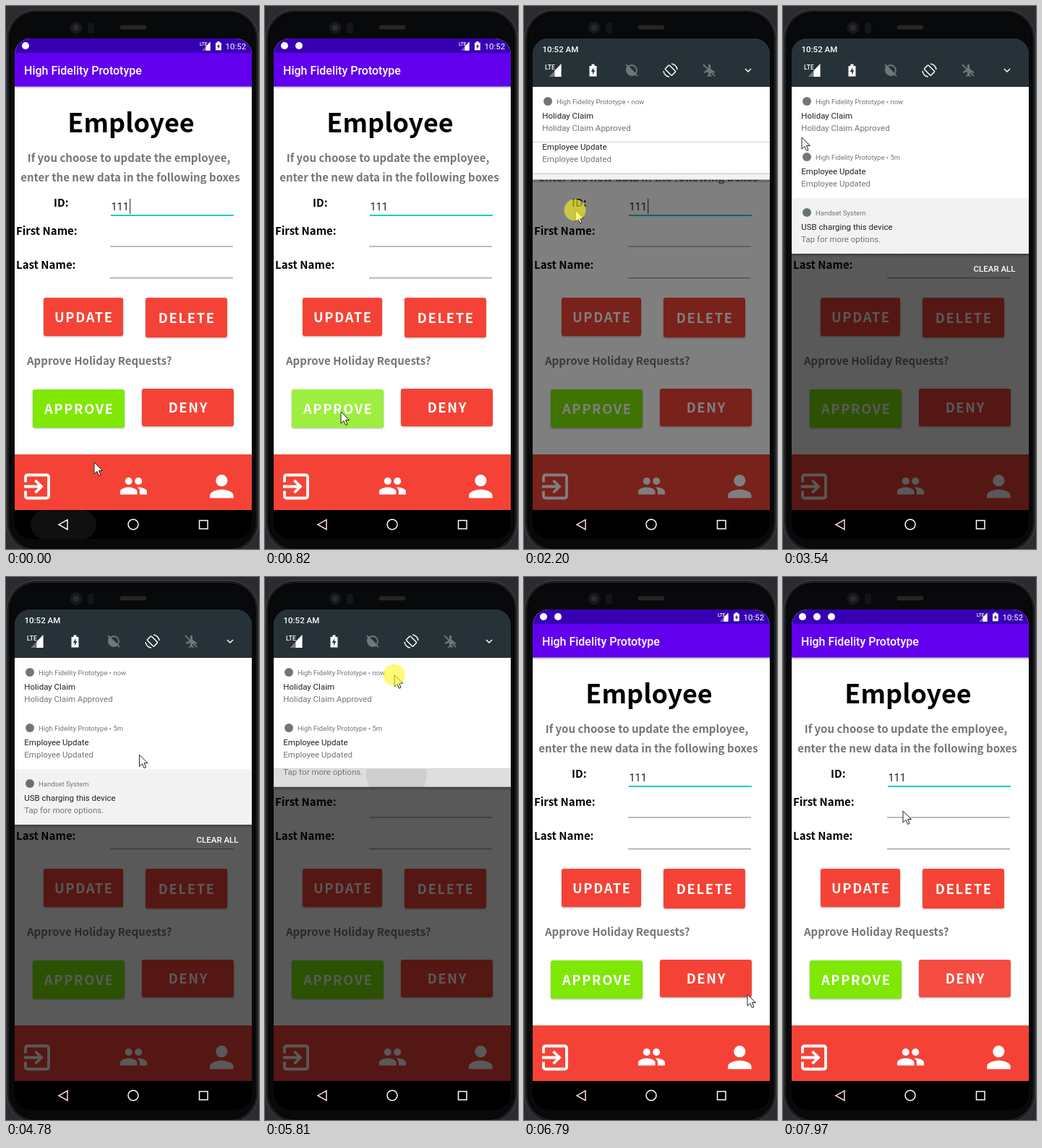
Recreate the animation shown at these times as an HTML page. Size 350 by 752 pixels, loop 8 s.

```html
<!DOCTYPE html>
<html lang="en">
<head>
<meta charset="utf-8">
<title>Employee app</title>
<style>
  html, body { margin: 0; width: 100%; height: 100%; overflow: hidden; background: #2a2c2f; }
  svg { display: block; }
  text { font-family: Roboto, sans-serif; white-space: pre; }
  .bold { font: 700 15px "Noto Sans CJK JP", "Noto Sans CJK SC", "Noto Sans CJK", sans-serif; }
  .grey { fill: #757575; }
  .mid { text-anchor: middle; }
  .label { font-size: 18.35px; letter-spacing: 1.64px; fill: #fff; text-anchor: middle; }
  .button { filter: drop-shadow(0 1.5px 1.2px rgba(0, 0, 0, .32)); }
  .small { font-size: 9.5px; fill: #757575; }
  .line { font-size: 11.5px; fill: #212121; }
  .sub { font-size: 11.5px; fill: #757575; }
  .medium { font-weight: 500; font-size: 11.5px; fill: #fff; }
  .outline { fill: none; stroke: #fff; stroke-width: 1.5; }
  .off { fill: none; stroke: #6d777c; stroke-width: 1.8; }
</style>
</head>
<body>
<svg width="100%" height="100%" viewBox="0 0 350 752">
  <defs>
    <clipPath id="screenClip"><path d="M12 698V67a22 22 0 0 1 22-22H318a22 22 0 0 1 22 22V698z"/></clipPath>
    <clipPath id="approveClip"><rect x="37" y="531" width="127" height="53" rx="3"/></clipPath>
    <clipPath id="denyClip"><rect x="188" y="530" width="127" height="52" rx="3"/></clipPath>
    <linearGradient id="shade" x2="0" y2="1">
      <stop stop-opacity=".3"/><stop offset="1" stop-opacity="0"/>
    </linearGradient>
    <path id="head" d="M12 12a4 4 0 0 0 0-8 4 4 0 0 0 0 8zm0 2c-2.67 0-8 1.34-8 4v2h16v-2c0-2.66-5.33-4-8-4z"/>
    <g id="battery">
      <path d="M0 2.5H3V0H7V2.5H10V17H0z" fill="#fff"/>
      <path d="M5.8 4.5L2.4 10.5H4.6V14.8L7.8 8.8H5.8z" fill="#263238"/>
    </g>
    <g id="signal">
      <path d="M17 0V18H0z" fill="#fff" opacity=".35"/>
      <path d="M17 0V18H8V9.5z" fill="#fff"/>
    </g>
  </defs>

  <!-- Handset -->
  <rect x="1" y="5" width="348" height="751" rx="40" fill="#1b1c1e" stroke="#45474a"/>
  <rect x="5" y="9" width="340" height="742" rx="36" fill="#08090a" stroke="#000"/>
  <rect x="158" y="27" width="36" height="5" rx="2.5" fill="#242526" stroke="#303132" stroke-width=".6"/>
  <circle cx="97" cy="30" r="8.5" fill="#17181a"/>
  <circle cx="97" cy="30" r="4" fill="#2a2b2f"/>
  <rect x="113" y="23" width="9" height="15" rx="4" fill="#141516"/>
  <path d="M12 698H340V716a22 22 0 0 1-22 22H34a22 22 0 0 1-22-22z"/>
  <rect id="backGlow" x="34" y="698" width="91" height="40" rx="20" fill="#101010"/>
  <path id="back" class="outline" d="M85 711.5V725L73 718.2z"/>
  <circle class="outline" cx="176" cy="718" r="7"/>
  <rect class="outline" x="267.5" y="712.5" width="11.5" height="11.5"/>

  <g clip-path="url(#screenClip)">
    <rect x="12" y="45" width="328" height="576" fill="#fff"/>
    <rect x="12" y="111" width="328" height="4" fill="url(#shade)"/>
    <rect x="12" y="65" width="328" height="46.5" fill="#6200ee"/>
    <rect x="12" y="45" width="328" height="20" fill="#3700b3"/>
    <g id="status" fill="#fff">
      <circle cx="27" cy="55" r="5"/>
      <circle id="note2" cx="47" cy="55" r="5"/>
      <circle id="note3" cx="67" cy="55" r="5"/>
      <text x="268" y="54.5" font-size="6.5" font-weight="500">LTE</text>
      <use href="#signal" transform="translate(271 49.5) scale(.68)"/>
      <use href="#battery" transform="translate(290 49) scale(.78 .72)"/>
      <text x="303.5" y="59.5" font-size="11.5">10:52</text>
    </g>
    <text x="25" y="95" font-size="16" font-weight="500" fill="#fff">High Fidelity Prototype</text>

    <text class="bold mid" x="173" y="175" style="font-size:35.9px">Employee</text>
    <text class="bold grey mid" x="170" y="216">If you choose to update the employee,</text>
    <text class="bold grey mid" x="172" y="242.500">enter the new data in the following boxes</text>
    <text class="bold" x="66" y="277.500">ID:</text>
    <text class="bold" x="14" y="317">First Name:</text>
    <text class="bold" x="14" y="364">Last Name:</text>
    <text x="145.500" y="283" font-size="14.4" fill="#212121">111</text>
    <rect id="caret" x="171" y="267" width="1.2" height="21" fill="#444"/>
    <path d="M145 290H315" stroke="#1bcdc5" stroke-width="1.8"/>
    <path d="M144 333H314M144 376.700H314" stroke="#7c7c7c"/>
    <text class="bold grey" x="29" y="497">Approve Holiday Requests?</text>
    <g id="buttons"></g>
    <circle id="approveRipple" cx="105" cy="562" fill="#fff" clip-path="url(#approveClip)"/>
    <circle id="denyRipple" cx="309" cy="578" fill="#fff" clip-path="url(#denyClip)"/>

    <rect x="12" y="621" width="328" height="77" fill="#f44336"/>
    <g fill="none" stroke="#fff" stroke-width="3.8">
      <path d="M27 659.500V652a2.500 2.500 0 0 1 2.500-2.500H56.500a2.500 2.500 0 0 1 2.500 2.500V679a2.500 2.500 0 0 1-2.500 2.500H29.500A2.500 2.500 0 0 1 27 679V671.500M25 665.500H48M40.500 657L49 665.500 40.500 674"/>
    </g>
    <g fill="#fff">
      <g transform="translate(156.300 644.600) scale(1.68)">
        <circle cx="8" cy="8" r="3"/><circle cx="16" cy="8" r="3"/>
        <path d="M8 13c-2.330 0-7 1.170-7 3.500V19h14v-2.500c0-2.330-4.670-3.500-7-3.500zM16 13l-1 .05c1.160.84 2 1.970 2 3.450V19h6v-2.500c0-2.330-4.670-3.500-7-3.500z"/>
      </g>
      <use href="#head" transform="translate(274 641) scale(2.030)"/>
    </g>

    <!-- Notification shade -->
    <rect id="dim" x="12" y="45" width="328" height="653"/>
    <text id="clear" class="medium" x="263.500" y="368">CLEAR ALL</text>
    <g id="panel">
      <rect id="edge" x="12" width="328" height="5" fill="url(#shade)"/>
      <g id="rows"></g>
      <g id="header">
        <rect x="12" y="0" width="328" height="112" fill="#263238"/>
        <text class="medium" x="25.500" y="64">10:52 AM</text>
        <text class="medium" x="29" y="88" style="font-size:8.500px">LTE</text>
        <use href="#signal" x="34.500" y="80"/>
        <use href="#battery" x="90.500" y="80.500"/>
        <circle class="off" cx="149" cy="89" r="7"/>
        <path d="M143 82a9 9 0 0 0 12 13z" fill="#6d777c"/>
        <path class="off" d="M141 81L157 97"/>
        <rect class="outline" x="-4" y="-6.500" width="8" height="13" rx="1" transform="translate(202.500 89) rotate(-45)"/>
        <path class="outline" d="M204 80a9 9 0 0 1 8 8M201 98a9 9 0 0 1-8-8"/>
        <path d="M255 81h3v6l6 4v2l-6-2v4l2 2v1l-3.500-1-3.500 1v-1l2-2v-4l-6 2v-2l6-4z" fill="#6d777c"/>
        <path class="off" d="M248 81L264 97"/>
        <path class="outline" d="M306 87L310 91 314 87" stroke-width="2"/>
      </g>
    </g>
  </g>

  <path id="cursor" d="M0 0V16L4 12.500 6.500 18.500 9 17.300 6.500 11.500H11.500z" fill="#fff" stroke="#222" stroke-width="1"/>
  <circle id="halo" r="15" fill="#fff51e" opacity=".6"/>
</svg>

<script>
const LOOP = 8000;
const el = id => document.getElementById(id);
const clamp = (v, lo = 0, hi = 1) => Math.min(hi, Math.max(lo, v));
const set = (node, attrs) => { for (const k in attrs) node.setAttribute(k, attrs[k]); };
const fade = (t, from, to) => clamp((t - from) / (to - from));
const within = (t, spans) => spans.some(([a, b]) => t >= a && t < b);

// Each point: time, values..., with "ease" last when the move into it is smooth.
function follow(track, t) {
  const i = track.findIndex(p => p[0] > t);
  if (i === 0) return track[0].slice(1);
  if (i < 0) return track[track.length - 1].slice(1);
  const a = track[i - 1], b = track[i];
  let k = (t - a[0]) / (b[0] - a[0]);
  if (b.includes("ease")) k = k * k * (3 - 2 * k);
  return a.slice(1).map((v, n) => v + (b[n + 1] - v) * k);
}

const RED = "#f44336";
const buttons = [
  ["UPDATE", 52, 404, 110, 53, RED], ["DELETE", 193, 404, 113, 55, RED],
  ["APPROVE", 37, 531, 127, 53, "#7fe805"], ["DENY", 188, 530, 127, 52, RED]
];
el("buttons").innerHTML = buttons.map(([name, x, y, w, h, fill]) =>
  `<rect class="button" x="${x}" y="${y}" width="${w}" height="${h}" rx="3" fill="${fill}"/>
   <text class="bold label" x="${x + w / 2 + .8}" y="${y + h / 2 + 7}">${name}</text>`).join("");

const ROW = 77, TOP = 112, FULL = TOP + 3 * ROW;
const notes = [
  ["High Fidelity Prototype • now", "Holiday Claim", "Holiday Claim Approved", "#fff", "#757575"],
  ["High Fidelity Prototype • 5m", "Employee Update", "Employee Updated", "#fff", "#757575"],
  ["Handset System", "USB charging this device", "Tap for more options.", "#f2f2f2", "#66736f"]
];
el("rows").innerHTML = notes.map(([app, title, body, fill, dot], i) =>
  `<svg x="12" width="328"><rect class="bg" width="328" height="400" fill="${fill}"/>
   <g>${i === 2 ? '<circle id="press" cx="170" cy="59" fill="#000" opacity=".07"/>' : ""}
     <circle cx="21" cy="20" r="6" fill="${dot}"/>
     <text class="small" x="33" y="23.500">${app}</text>
     <text class="line" x="13.300" y="44">${title}</text>
     <text class="sub" x="13.300" y="60.500">${body}</text></g>
   <rect class="rule" width="328" height="1" fill="#d2d2d2"/></svg>`).join("");
const rows = [...el("rows").children];

const cursorTrack = [
  [0, 122, 632], [70, 122, 632], [420, 105, 562, "ease"], [830, 105, 562],
  [1600, 71, 58, "ease"], [1790, 71, 58], [2200, 71, 282], [2400, 73, 390],
  [2630, 75, 400], [3300, 26, 162, "ease"], [3470, 25, 178], [3540, 26, 182],
  [4240, 181, 200, "ease"], [4310, 184, 201], [4650, 184, 201],
  [5120, 187, 439, "ease"], [5400, 183, 325, "ease"], [5610, 183, 325],
  [5810, 179, 136], [6090, 198, 53], [6370, 206, 50],
  [6790, 309, 578, "ease"], [7330, 309, 578], [7930, 166, 324, "ease"], [LOOP, 166, 324]
];
const panelTrack = [
  [0, 40], [1790, 40], [2200, 240], [2410, FULL], [5712, FULL], [6285, 40], [LOOP, 40]
];
const haloSpans = [[400, 560], [1590, 2500], [5350, 6020], [7120, 7290]];

function drawPanel(t) {
  const [bottom] = follow(panelTrack, t);
  const head = Math.min(TOP, bottom - 62);
  const ends = [Math.min(TOP + ROW, bottom - 16), Math.min(TOP + 2 * ROW, bottom - 8), bottom];
  el("panel").style.display = bottom > 45 ? "" : "none";
  set(el("header"), { transform: `translate(0 ${head - TOP})` });
  set(el("edge"), { y: bottom });
  rows.forEach((row, i) => {
    const y = i ? ends[i - 1] : head, h = Math.max(0, ends[i] - y);
    const nextCollapsed = i < 2 && ends[i + 1] - ends[i] < ROW - 1;
    set(row, { y, height: h });
    set(row.querySelector("g"), { transform: `translate(0 ${h - ROW})` });
    set(row.querySelector(".rule"), { y: h - 1, opacity: nextCollapsed ? 1 : 0 });
  });
  const pressed = t > 5400 && t < 6400;
  set(rows[2].querySelector(".bg"), { fill: pressed ? "#dedede" : "#f2f2f2" });
  set(el("press"), { r: pressed ? 42 * fade(t, 5400, 5700) : 0 });
  set(el("dim"), { opacity: clamp(.1 + (bottom - 143) * .00412, 0, .65) });
  set(el("clear"), { opacity: fade(t, 2450, 2700) * (1 - fade(t, 5650, 5740)) });
}

function ripple(id, t, start, fadeFrom, fadeTo) {
  set(el(id), {
    r: 140 * fade(t, start, start + 350),
    opacity: t < start ? 0 : .24 * (1 - fade(t, fadeFrom, fadeTo))
  });
}

function draw(t) {
  const [x, y] = follow(cursorTrack, t);
  set(el("cursor"), { transform: `translate(${x} ${y})` });
  set(el("halo"), { cx: x - .5, cy: y, visibility: within(t, haloSpans) ? "visible" : "hidden" });

  const blink = t < 6120 ? t : t - 6120;
  set(el("caret"), { opacity: Math.floor(blink / 500) % 2 ? 0 : 1 });
  set(el("backGlow"), { opacity: 1 - fade(t, 70, 500) });
  el("back").style.stroke = t < 500 ? "#fff" : "#ffdcd8";

  set(el("note2"), { opacity: fade(t, 640, 800) });
  set(el("note3"), { opacity: fade(t, 7400, 7560) });
  set(el("status"), { opacity: t < 2000 ? 1 : fade(t, 6370, 6560) });
  ripple("approveRipple", t, 430, 800, 1300);
  ripple("denyRipple", t, 7130, 7600, 8080);
  drawPanel(t);
}

const start = performance.now();
function tick() {
  draw((performance.now() - start) % LOOP);
  requestAnimationFrame(tick);
}
tick();
</script>
</body>
</html>
```
